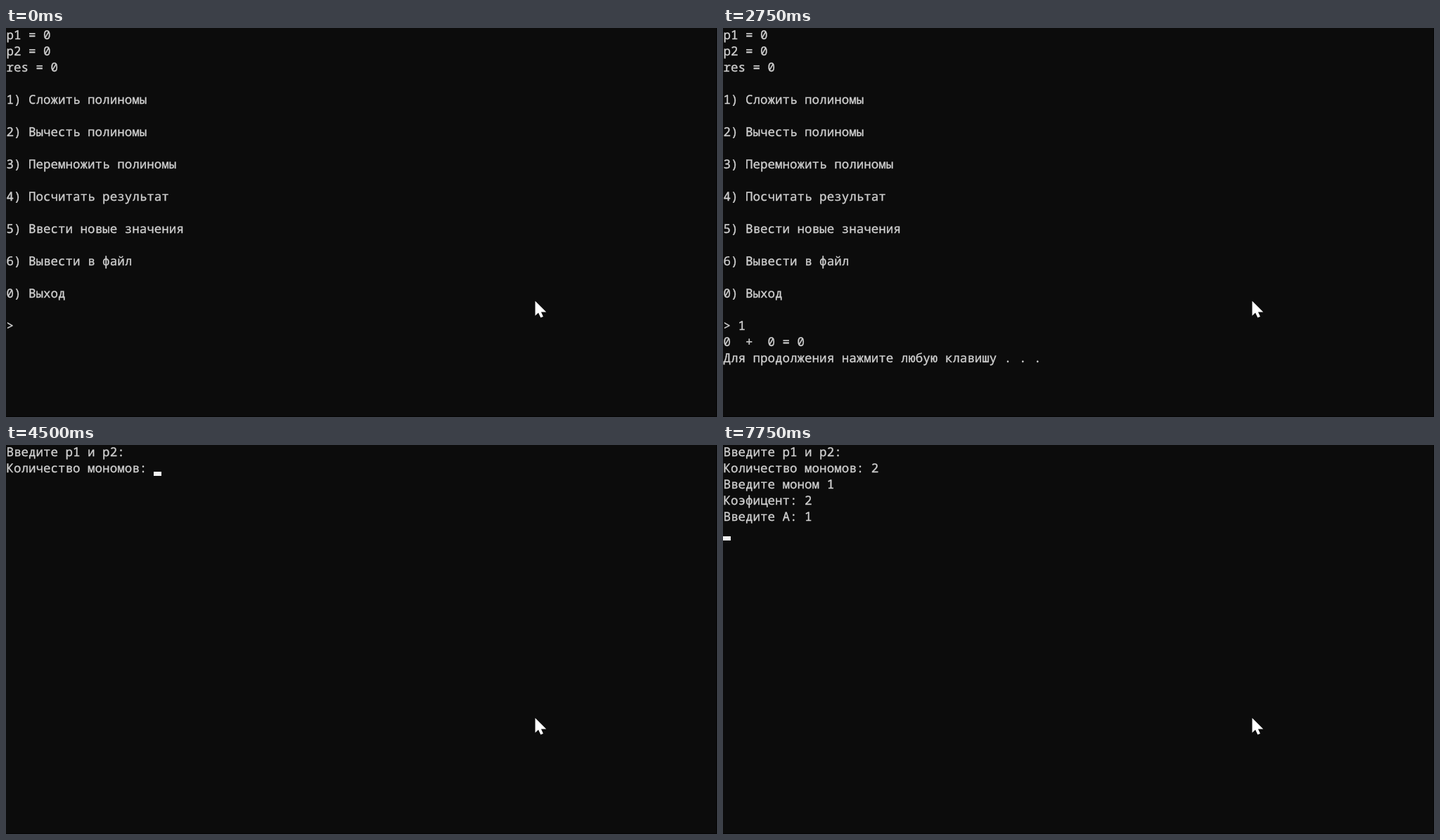
These frames come from a looping animation (1011 px wide and 554 px high, 8000 ms). An HTML page:

```html
<!DOCTYPE html>
<html lang="ru">
<head>
<meta charset="utf-8">
<title>Полиномы</title>
<style>
  html, body { margin: 0; width: 100%; height: 100%; overflow: hidden; background: #0c0c0c; }
  svg { display: block; width: 1011px; height: 554px; }
  text {
    font: 17.53px "Noto Sans Mono", "DejaVu Sans Mono", monospace;
    font-variant-ligatures: none;
    text-rendering: geometricPrecision;
    white-space: pre;
    fill: #d0d0d0;
    stroke: #d0d0d0;
    stroke-width: 0.35px;
  }
</style>
</head>
<body>
<svg viewBox="0 0 1011 554">
  <rect width="1011" height="554" fill="#0c0c0c"/>
  <path d="M1010 0h1v554H0v-1h1010z" fill="#050505"/>
  <g id="lines"></g>
  <rect id="caret" width="10.52" height="5.6" fill="#f2f2f2" shape-rendering="crispEdges"/>
  <path d="M752.5 388.8V409.8L757 405.6L760.3 412.6L763.9 411L760.9 404.6H768.2Z" fill="#fff"/>
</svg>
<script>
const LOOP = 8000, COL = 10.52, ROW = 22.97, LEFT = 0.5, BASE = 16.2, CARET_TOP = 15.2;

const menu = [
  'p1 = 0', 'p2 = 0', 'res = 0', '',
  ...['1) Сложить полиномы', '2) Вычесть полиномы', '3) Перемножить полиномы',
    '4) Посчитать результат', '5) Ввести новые значения', '6) Вывести в файл',
    '0) Выход'].flatMap(item => [item, '']),
  '> '
].join('\n');
const sum = menu + '1\n0  +  0 = 0\nДля продолжения нажмите любую клавишу . . . ';
const count = 'Введите p1 и p2:\nКоличество мономов: ';
const factor = count + '2\nВведите моном 1\nКоэфицент: ';
const power = factor + '2\nВведите A: ';

// [start ms, console text, caret shown]; the caret follows the text
const steps = [
  [0, menu, 0], [1500, menu + '1', 0], [1750, menu + '1', 1],
  [2000, sum, 1], [2250, sum, 0], [2500, sum, 1], [2750, sum, 0],
  [3000, menu, 1], [3250, menu, 0], [3500, menu, 1], [3750, menu, 0],
  [4000, menu + '5', 0], [4250, menu + '5', 1],
  [4500, count, 1], [5000, count, 0], [5250, count, 1],
  [5500, count + '2', 0], [5750, count + '2', 1], [6000, count, 0],
  [6250, factor, 1], [6750, factor, 0], [7000, factor + '2', 0],
  [7250, power, 1], [7500, power, 0], [7750, power + '1\n', 1]
];

const lines = document.getElementById('lines');
const caret = document.getElementById('caret');
let shown;

function show([, text, caretOn]) {
  const rows = text.split('\n');
  lines.replaceChildren(...rows.map((row, i) => {
    const el = document.createElementNS('http://www.w3.org/2000/svg', 'text');
    el.setAttribute('x', LEFT);
    el.setAttribute('y', i * ROW + BASE);
    el.textContent = row;
    return el;
  }));
  caret.setAttribute('x', rows.at(-1).length * COL);
  caret.setAttribute('y', (rows.length - 1) * ROW + CARET_TOP);
  caret.setAttribute('opacity', caretOn);
}

function tick() {
  const t = performance.now() % LOOP;
  const step = steps.findLast(([start]) => start <= t);
  if (step !== shown) show(shown = step);
  requestAnimationFrame(tick);
}
tick();
</script>
</body>
</html>
```
